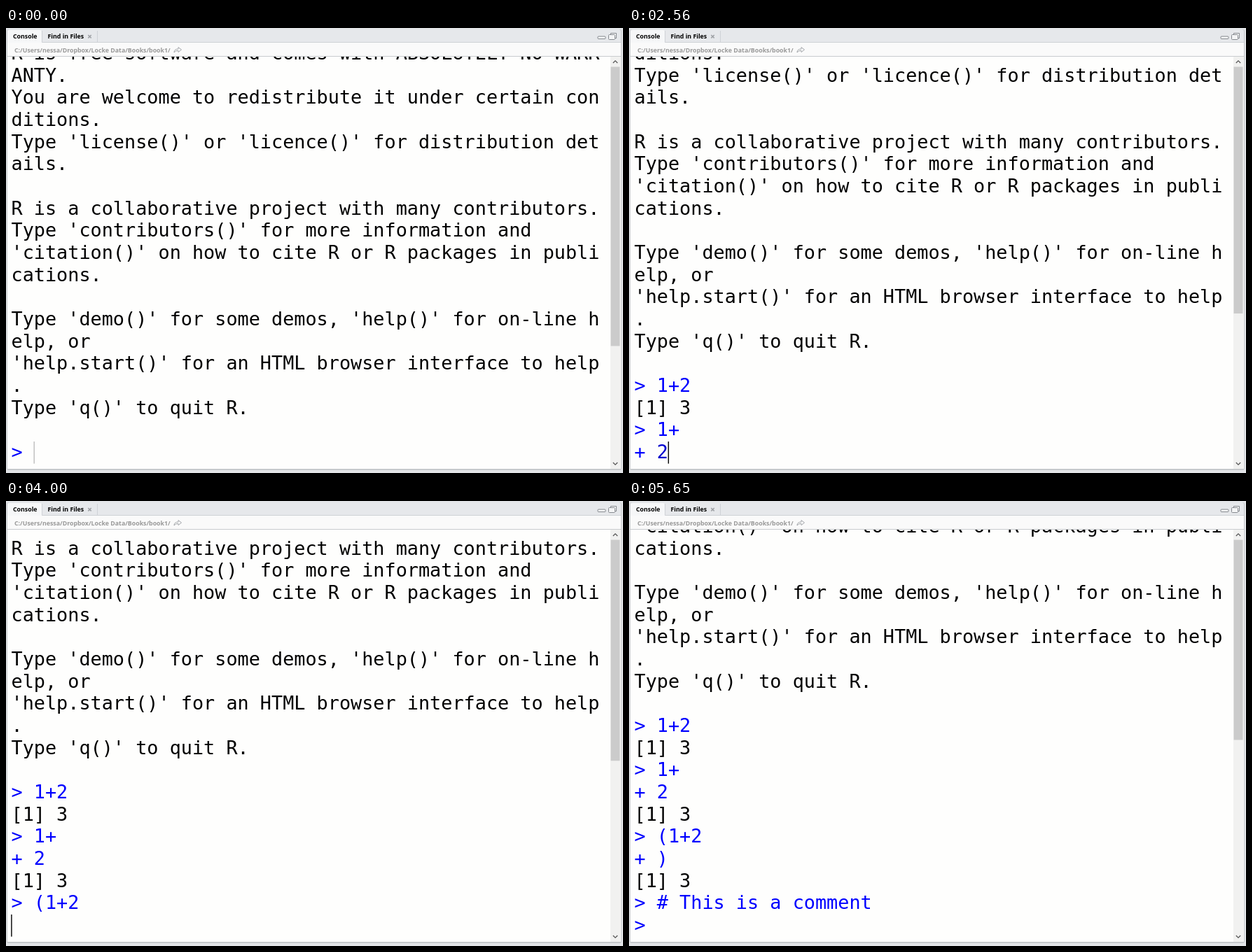
Animation, 881 px wide and 636 px high, one loop 5.73 s. Source, as an HTML page:

```html
<!DOCTYPE html>
<html lang="en">
<head>
<meta charset="utf-8">
<title>R console</title>
<style>
  html, body { margin: 0; width: 100%; height: 100%; overflow: hidden; background: #e3e5e8; }
  svg { display: block; width: 881px; height: 636px; }
  text { white-space: pre; }
  #rows { font: 26.83px "DejaVu Sans Mono", "Noto Sans Mono", monospace; }
  .ui { font: 700 8.8px "Open Sans", "Noto Sans", sans-serif; }
  .line { fill: none; stroke: #555; stroke-width: 1.2; }
  .icon { fill: none; stroke: #a3a6aa; }
  .cross { fill: none; stroke: #a0a3a7; stroke-width: 1.6; }
  .window { fill: #f4f5f6; stroke: #85898e; }
</style>
</head>
<body>
<svg viewBox="0 0 881 636">
  <rect x="1" y="2" width="878" height="630" rx="3" fill="#c6c9cc"/>
  <rect x="2" y="40" width="876" height="590" fill="#fefefd"/>
  <g id="rows"></g>
  <rect id="cursor" y="591" width="1.4" height="31.6"/>

  <!-- tab strip and path bar -->
  <path d="M2 41V5q0-3 3-3H875q3 0 3 3V41Z" fill="#e6e8eb"/>
  <rect x="2" y="21" width="876" height="19" fill="#fafafa"/>
  <rect x="2" y="40" width="876" height="1" fill="#c9cccf"/>
  <path d="M2 21V5q0-2 2-2H49q2 0 2 2V21Z" fill="#f6f7f8"/>
  <path d="M51.5 4V20.5H878M130.5 4V20" fill="none" stroke="#cfd2d6"/>
  <g class="ui">
    <text x="10" y="15">Console</text>
    <text x="59.5" y="15">Find in Files</text>
    <text x="12" y="35" fill="#999">C:/Users/nessa/Dropbox/Locke Data/Books/book1/</text>
  </g>
  <path d="M117.3 10l4.4 4.4m0-4.4l-4.4 4.4" class="cross"/>
  <path d="M240 35q0-5 6-5V27.5L250.5 31L246 34.5V32.3Q242 32 240 35Z" class="icon"/>
  <rect x="845" y="12" width="11" height="3.5" rx="1" class="window"/>
  <path d="M863.5 9.5V7.5H871.5V14.5H869.5" class="window"/>
  <rect x="860.5" y="9.5" width="9" height="7" rx="1" class="window"/>

  <!-- scrollbar -->
  <rect x="863" y="41" width="14.5" height="589" fill="#f1f1f0"/>
  <rect id="thumb" x="863.5" y="55.5" width="13" fill="#cbcbcb"/>
  <path d="M866.8 50l3.2-3.2l3.2 3.2M866.8 621l3.2 3.2l3.2-3.2" class="line"/>
</svg>
<script>
const LOOP = 5730;
const PITCH = 31.67, ADVANCE = 16.15, BASELINE = 614.9, VISIBLE_ROWS = 19;
const BLUE = '#0000ff', NUMBER = '#0000cd', PUNCT = '#687687', COMMENT = '#4c886b';
const BLACK = '#000', FADED = '#bdbdbd', OFF = 'none';

const INTRO = `R is free software and comes with ABSOLUTELY NO WARR
ANTY.
You are welcome to redistribute it under certain con
ditions.
Type 'license()' or 'licence()' for distribution det
ails.

R is a collaborative project with many contributors.
Type 'contributors()' for more information and
'citation()' on how to cite R or R packages in publi
cations.

Type 'demo()' for some demos, 'help()' for on-line h
elp, or
'help.start()' for an HTML browser interface to help
.
Type 'q()' to quit R.
`.split('\n');

const REMARK = '> # This is a comment';
const LOG = ['> 1+2', '[1] 3', '> 1+', '+ 2', '[1] 3', '> (1+2', '+ )', '[1] 3', REMARK];

// time, committed log lines, live line, cursor column, cursor colour
const STEPS = [
  [0, 0, '> ', 2, FADED],
  [780, 0, '> 1', 3],
  [1080, 0, '> 1+', 4],
  [1260, 0, '> 1+2', 5],
  [1440, 1, '', 0],
  [1480, 2, '> ', 2],
  [1690, 2, '> 1', 3],
  [1950, 2, '> 1+', 4],
  [2260, 3, '', 0],
  [2300, 3, '+ ', 2],
  [2520, 3, '+ 2', 3],
  [2690, 4, '', 0],
  [2730, 5, '> ', 2],
  [2860, 5, '> ', 2, FADED],
  [3000, 5, '> ', 2, OFF],
  [3170, 5, '> ()', 3],
  [3260, 5, '> (1)', 4],
  [3470, 5, '> (1+)', 5],
  [3730, 5, '> (1+2)', 6],
  [3860, 5, '> (1+2', 6],
  [4000, 6, '', 0],
  [4040, 6, '+ ', 2],
  [4260, 6, '+ )', 3],
  [4430, 7, '', 0],
  [4470, 8, '> ', 2],
  [4600, 8, '> #', 3],
  [4690, 8, '> # ', 4],
  [4780, 8, '> # T', 5],
  [4820, 8, '> # Th', 6],
  ...Array.from({ length: 10 }, (_, i) => {
    const typed = 6 + Math.round((i + 1) * 1.5);
    return [4860 + i * 56, 8, REMARK.slice(0, typed), typed];
  }),
  [5430, 9, '', 0],
  [5470, 9, '> ', 2],
  [5650, 9, '> ', 2, OFF],
];

const byId = id => document.getElementById(id);
const make = (tag, parent) =>
  parent.appendChild(document.createElementNS('http://www.w3.org/2000/svg', tag));

const rows = Array.from({ length: VISIBLE_ROWS }, (_, i) => {
  const row = make('text', byId('rows'));
  row.setAttribute('x', 7.5);
  row.setAttribute('y', Math.round(BASELINE - (VISIBLE_ROWS - 1 - i) * PITCH));
  return row;
});

function tokenColour(token) {
  if (token[0] === '#') return COMMENT;
  return /\d/.test(token) ? NUMBER : PUNCT;
}

function drawLive(row, line) {
  row.textContent = '';
  const add = (text, colour) => {
    const span = make('tspan', row);
    span.textContent = text;
    span.setAttribute('fill', colour);
  };
  add(line.slice(0, 2), BLUE);
  for (const token of line.slice(2).match(/#.*|\d+|[^#\d]+/g) || []) add(token, tokenColour(token));
}

function draw([, count, live, column, colour = BLACK]) {
  const log = LOG.slice(0, count).map(text => [text, text[0] === '[' ? BLACK : BLUE]);
  const lines = [...INTRO.map(text => [text, BLACK]), ...log].slice(1 - VISIBLE_ROWS);
  lines.forEach(([text, fill], i) => {
    rows[i].textContent = text;
    rows[i].setAttribute('fill', fill);
  });
  drawLive(rows[VISIBLE_ROWS - 1], live);
  byId('cursor').setAttribute('x', 7.2 + column * ADVANCE);
  byId('cursor').setAttribute('fill', colour);
  byId('thumb').setAttribute('height', 9085 / (22.77 + count));
}

const start = performance.now();
let shown;
function tick() {
  const time = (performance.now() - start) % LOOP;
  const step = STEPS.findLast(([from]) => from <= time);
  if (step !== shown) draw(shown = step);
  requestAnimationFrame(tick);
}
tick();
</script>
</body>
</html>
```
